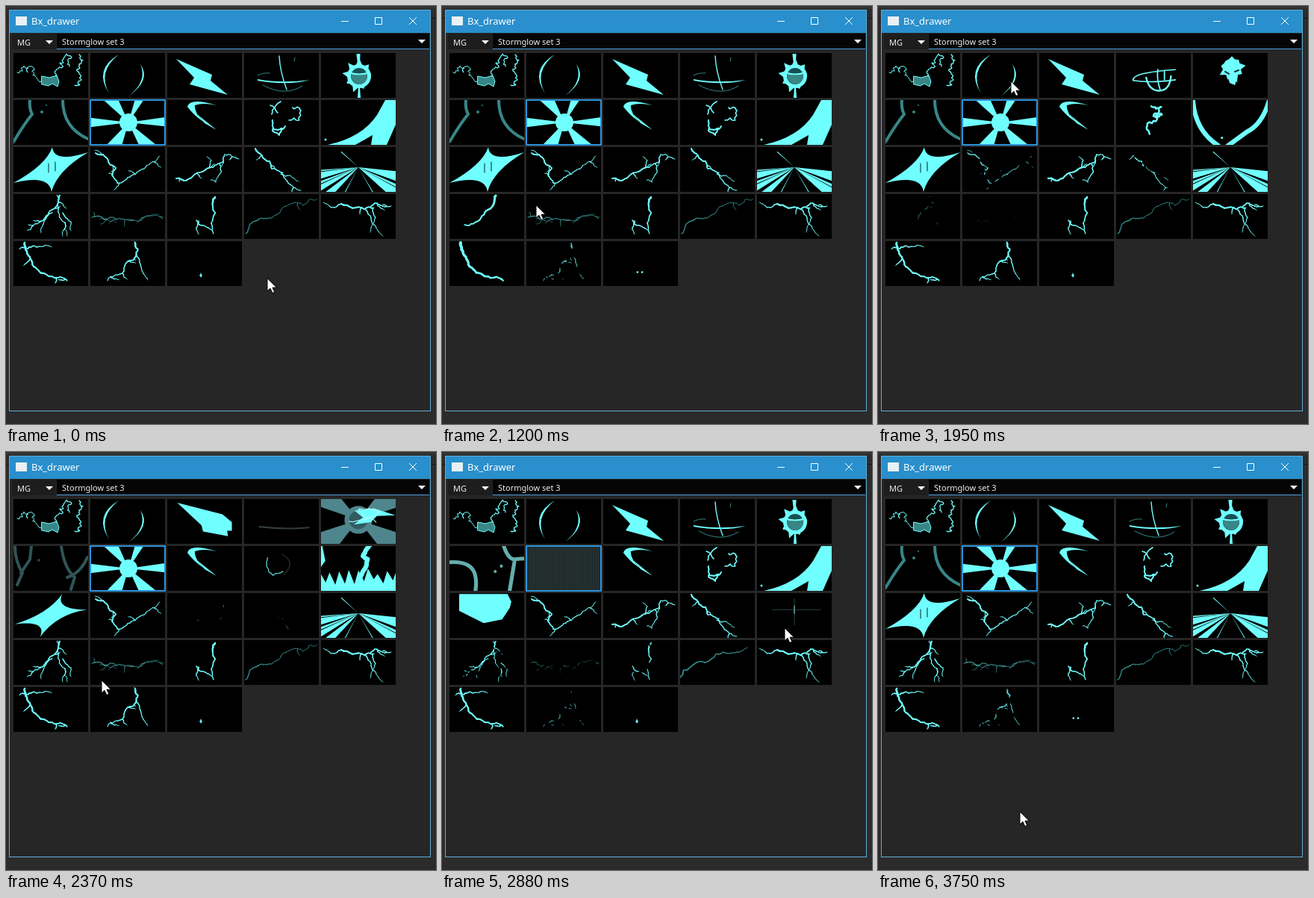
An HTML page with a canvas for the animation above (4.02 s loop, 576 by 560 pixels).

```html
<!DOCTYPE html>
<html lang="en">
<head>
<meta charset="utf-8">
<title>Preset browser</title>
<style>
  html, body { margin: 0; width: 100%; height: 100%; overflow: hidden; background: #2b2b2b; }
  svg, canvas { position: absolute; left: 0; top: 0; width: 576px; height: 560px; }
  text { font-family: "Noto Sans", "Open Sans", sans-serif; font-size: 11px; fill: #eee; }
  .title { font-size: 13px; fill: #fff; }
</style>
</head>
<body>
<svg viewBox="0 0 576 560">
  <path fill="#333" d="M0 0H576V4H0Z"/>
  <path stroke="#171717" d="M0 16.5H576"/>
  <path fill="#262626" d="M4 5H569V543H4Z"/>
  <path fill="#298fcd" d="M4 5H569V36H4Z"/>
  <rect x="4.5" y="5.5" width="564" height="537" fill="none" stroke="#5faed8"/>
  <path fill="#e9f1f4" d="M13 14H28V26H13Z"/>
  <text class="title" x="34" y="25">Bx_drawer</text>
  <path fill="none" stroke="#fff" d="M449 20.5H459M494.5 15.5H503.5V24.5H494.5ZM540 15L550 25M550 15L540 25"/>
  <path fill="#1d1d1d" d="M8 37H67V58H8Z"/>
  <path fill="#050505" d="M68 37H567V57H68Z"/>
  <path stroke="#4a9fe0" d="M68 57.5H567"/>
  <text x="15" y="53">MG</text>
  <text x="75" y="52">Stormglow set 3</text>
  <path fill="#f4f4f4" d="M53 46H63L58 51ZM552 45H562L557 50Z"/>
</svg>
<canvas width="576" height="560"></canvas>
<script>
const g = document.querySelector('canvas').getContext('2d');
const CYAN = '#70ffff', DIM = '#388686';
const LOOP = 4020, STEP = 30, START = 720, STOP = 3750, PLAY = 960;

const rnd = n => { const s = Math.sin(n * 127.1) * 43758.5453; return s - Math.floor(s); };
const polar = (x, y, deg, r) => {
  const a = deg * Math.PI / 180;
  return `${x + r * Math.cos(a)} ${y + r * Math.sin(a)}`;
};
const disc = (x, y, r) => `M${x - r} ${y}a${r} ${r} 0 1 1 ${2 * r} 0a${r} ${r} 0 1 1 ${-2 * r} 0Z`;

// Beams from a centre, as [angle, half width]
const beams = (x, y, r, ...list) => list.map(([a, h]) =>
  `M${x} ${y}L${polar(x, y, a - h, r)}L${polar(x, y, a + h, r)}Z`).join('');

// Closed star with tips of random length
const burst = (x, y, n, inner, outer, seed) => 'M' + Array.from({ length: 2 * n }, (_, i) =>
  polar(x, y, -90 + i * 180 / n, i % 2 ? inner : inner + (outer - inner) * rnd(seed + i))).join('L') + 'Z';

// Row of flames rising from the lower edge
const flames = (n, seed) => 'M0 60' + Array.from({ length: n }, (_, i) =>
  `L${i * 100 / n} ${30 + 10 * rnd(seed + i)}L${(i + .6) * 100 / n} ${44 + 8 * rnd(seed - i)}`).join('') + 'L100 32V60Z';

// Midpoint displacement between key points
function jag(text, seed, amp = .35) {
  const n = text.trim().split(' ').map(Number);
  let pts = [];
  for (let i = 0; i < n.length; i += 2) pts.push([n[i], n[i + 1]]);
  for (let level = 0; level < 3; level++) {
    pts = pts.flatMap((b, i) => {
      if (!i) return [b];
      const a = pts[i - 1], k = (rnd(seed++) - .5) * amp;
      return [[(a[0] + b[0]) / 2 - (b[1] - a[1]) * k, (a[1] + b[1]) / 2 + (b[0] - a[0]) * k], b];
    });
  }
  return pts;
}
const zig = (text, seed, amp) => 'M' + jag(text, seed, amp).map(p => p.join(' ')).join('L');

// Lightning: rest, flash of the main line, full, then broken up
let seed = 0;
function bolt(w, text, { twigs = 0, cut = .58, color = CYAN, flash } = {}) {
  const lines = text.split('/').map(t => jag(t, seed += 40));
  const main = lines[0], lead = flash ? jag(flash, seed) : main;
  for (let i = 0; i < twigs; i++) {
    const [x, y] = main[Math.floor((i + .5) / twigs * main.length)];
    const turn = (rnd(seed + i) - .5) * 24;
    lines.push(jag(`${x} ${y} ${x + turn} ${y + 6 + 4 * rnd(i + seed / 2) * (i % 2 ? 1 : -4)}`, seed += 7));
  }
  const all = (k, keep) => lines.forEach((l, i) => trace(l, w * k * (i ? .65 : 1), color, keep));
  return p => {
    if (p < .13) return all(1, 1);
    if (p < Math.min(cut, .4)) return trace(lead, w * 1.4, color, 1);
    if (p < cut) return all(1.15, 1);
    const keep = .04 + .7 * ((1 - p) / (1 - cut)) ** 1.5;
    g.globalAlpha = keep + .2;
    all(.85, keep);
    g.globalAlpha = 1;
  };
}

function trace(pts, w, color, keep) {
  g.strokeStyle = color;
  for (let i = 1; i < pts.length; i++) {
    if (rnd(Math.floor(i / 2) * 3.7 + pts[0][0]) > keep) continue;
    g.lineWidth = w * (1.3 - .7 * i / pts.length);
    g.beginPath();
    g.moveTo(...pts[i - 1]);
    g.lineTo(...pts[i]);
    g.stroke();
  }
}

// A layer is [path, colour, stroke width]; no width means fill
function paint(layers) {
  for (const [d, color = CYAN, w] of layers) {
    const path = new Path2D(d);
    if (w) { g.strokeStyle = color; g.lineWidth = w; g.stroke(path); }
    else { g.fillStyle = color; g.fill(path); }
  }
}

// Resting picture, then poses as [start, layers]; each grows a little while it stays
const poses = (rest, ...list) => p => {
  const now = list.filter(q => q[0] <= p).pop();
  if (!now || p > .95) return paint(rest);
  const s = .96 + (p - now[0]) * .25;
  g.translate(50, 30);
  g.scale(s, s);
  g.translate(-50, -30);
  paint(now[1]);
};

const patch = 'M38 31L48 33L58 30L61 38L59 45L52 41L47 44L38 42Z';
const sun = beams(51, 30, 90, [180, 7], [234, 12], [295, 9], [359, 7], [52, 13], [120, 14]) + disc(51, 30, 12);

const cells = [
  poses([
    [patch, DIM], [patch, CYAN, 1],
    [zig('5 26 14 17 28 21 26 30 38 37', 3, 1.3), CYAN, 1],
    [zig('57 31 64 20 67 8 78 6 75 18', 8, 1.1), CYAN, 1.2],
    [zig('88 2 91 13 85 24 91 36 82 43', 5, 1.1), CYAN, 1.3]
  ]),
  poses([['M38 2Q4 22 25 54Q9 25 38 2M67 15Q82 36 51 58Q77 38 67 15']]),
  poses([['M12 8L60 29L58 37L81 56L30 42L36 33Z']],
    [.2, [['M15 6L73 21L85 31V42H79L80 49L48 43L46 35Z']]]),
  poses([
    ['M18 35Q50 41 88 36Q60 44 18 37Z'], ['M47 4Q48 25 57 49', CYAN, 1.4],
    ['M25 43Q55 59 78 44M18 30Q25 26 34 27M68 6L67 11', DIM, 1]
  ], [.12, [
    ['M80 22Q20 26 22 37Q45 41 80 36', CYAN, 1.6], ['M40 33Q44 51 58 51T74 31', CYAN, 2.4], ['M56 22Q54 34 59 49M65 24V36', CYAN, 1.8]]],
  [.4, [['M21 37Q55 41 86 38', '#333d3d', 2]]], [.8, []]),
  poses([
    [burst(51, 31, 9, 14, 26, 4) + beams(51, 31, 30, [-92, 5], [90, 4])], [disc(51, 31, 16)],
    [disc(51, 31, 11), '#175052'], ['M40 28Q51 31 62 28Q62 41 51 42Q40 40 40 28', DIM], ['M37 26Q51 31 65 26', CYAN, 2]
  ], [.12, [
    [burst(52, 20, 9, 12, 21, 7)], ['M46 30H60L56 43L49 40Z'], ['M43 25L48 28M56 25L61 23', '#103030', 2]]],
  [.45, [
    [beams(50, 28, 75, [35, 17], [145, 17], [215, 16], [325, 17]) + disc(50, 28, 18), '#4f858c'],
    [disc(50, 28, 12), '#315c61'], ['M45 16L70 13L98 22L74 23L66 31L44 34L56 25Z'], [zig('38 30 78 17 50 14 73 31', 2), '#b5ffff', 1]]]),

  poses([
    ['M22 0Q21 12 25 19Q15 31 0 56M66 0Q66 38 102 53', DIM, 4], [disc(38, 16, 2) + disc(44, 7, 1), DIM]
  ], [.12, [
    ['M2 0Q2 20 12 36L5 52M24 0L22 18L10 36M64 0Q68 30 82 42L77 58M99 15Q90 36 72 42', '#315456', 4], [disc(34, 19, 2), '#273d3f']]],
  [.55, [
    ['M0 22Q24 20 32 32Q38 42 35 60M72 0Q78 19 87 18T102 17M86 22L80 58', '#65aeae', 5], [disc(69, 27, 2) + disc(61, 34, 2), '#65aeae']]]),
  poses([[sun]], [.5, [['M-20 -20H120V80H-20Z', '#202b2c'],
    [Array.from({ length: 34 }, (_, i) => `M${i * 3 + 1} 0V60`).join(''), '#2a3433', 1]]]),
  poses([['M66 7Q30 -4 27 9Q35 20 48 29Q36 16 37 7Q48 3 66 7M40 19L66 40L50 31Z']]),
  poses([
    [zig('35 7 41 10 45 17', 1) + zig('49 2 37 19', 2) + zig('65 10 76 14 60 27', 9, .9), CYAN, 1.6],
    [zig('38 27 38 41 47 47 55 35', 6) + zig('39 39 51 38', 4), CYAN, 2]
  ], [.12, [[zig('47 9 60 10 50 22 61 20 48 31 45 45', 11, .9), CYAN, 2.4]]],
  [.6, [[zig('32 16 31 28 39 39 52 34', 3), '#62dada', 1.2], ['M51 12Q70 22 53 38', '#263030', 1.2]]]),
  poses([['M86 0H100V33L88 60H67L69 47L46 60H9Q55 50 75 20Z' + disc(6, 53, 1.5)]],
    [.12, [['M1 -2Q3 40 34 60M101 0Q92 32 72 42L46 61', CYAN, 6], [disc(39, 50, 1.5)]]],
    [.55, [[flames(8, 5)], [zig('66 -2 56 14 62 18 50 50', 3, .2), CYAN, 6], ['M0 0H3L7 20L0 30Z']]]),

  poses([
    ['M52 0Q54 22 100 7Q58 32 51 60Q48 36 0 48Q44 24 52 0Z'], ['M43 19Q34 30 45 43M61 16Q69 28 58 42', CYAN, 2],
    [disc(51, 28, 9)], ['M47 22V34M56 20V32', '#052222', 1]
  ], [.1, [['M66 0Q55 22 100 22Q58 28 35 60Q46 36 0 42Q46 28 66 0Z']]],
  [.4, [['M14 2H77L82 12L80 20L70 35L46 40L26 30L14 24Z']]]),
  bolt(1.5, '7 8 24 18 34 28 29 38 36 48 55 38 74 27 93 12', { twigs: 6, flash: '6 11 18 20 35 22 36 41 48 42 68 19 84 23 100 39' }),
  bolt(1.6, '12 42 22 45 47 33 56 28 75 20 77 10 96 16/70 22 72 34 65 47 58 44/56 28 59 18 53 13',
    { twigs: 5, flash: '0 54 22 41 50 26 62 28 83 21 100 14' }),
  bolt(1.6, '15 2 34 19 37 29 58 46 76 58/49 36 73 46', { twigs: 4, cut: .42 }),
  poses([
    [beams(50, 27, 90, [168, 5], [154, 6], [138, 5], [13, 7], [33, 9])], [beams(50, 27, 90, [118, .8], [60, .8], [175, 1])],
    [beams(50, 27, 31, [222, 1])], [beams(50, 27, 85, [156, .8], [28, .6]), '#0b3434']
  ], [.02, [['M20 22H86M50 7V43', '#2b4848', 1], ['M50 17V27', '#508080', 2]]],
  [.3, [[beams(50, 27, 75, [160, 5], [25, 7], [125, 2], [200, 1])]]]),

  bolt(1.7, '62 2 59 14 42 32 20 41/59 14 69 38 72 56/66 25 77 37 77 49/52 25 40 40 37 52/69 38 66 56', { twigs: 6 }),
  bolt(.9, '2 31 35 34 58 35 98 31/13 33 36 38/66 34 92 27', { twigs: 7, cut: .4, color: '#42a0a0' }),
  bolt(2, '64 4 61 16 62 53/39 35 54 45 61 50/42 36 42 54', { cut: .3 }),
  bolt(1, '2 53 16 36 30 33 50 20 79 15 98 6', { twigs: 2, color: '#359090', flash: '0 50 33 30 67 18 90 10' }),
  bolt(1.8, '27 13 58 20 72 12 94 16/58 20 69 40 83 56/69 18 73 31 66 51/27 13 14 18 3 11', { twigs: 5 }),

  bolt(2.1, '15 2 18 14 27 34 47 47 68 50 72 53/18 10 32 8 51 8', { twigs: 5 }),
  bolt(1.7, '60 2 62 20 45 40 23 53/62 20 71 43 77 52', { twigs: 5, cut: .14 }),
  poses([[disc(45, 46, 1.7)], ['M45 43V48', CYAN, 1]],
    [.1, [[disc(46, 41, 1.3) + disc(52, 41, 1.3)]]],
    [.65, [[disc(40, 48, 1.3)]]])
];

// Pointer path as time, x, y
const track = [
  [720, 346, 364], [980, 90, 345], [1040, 28, 300], [1180, 118, 270], [1340, 165, 246],
  [1430, 225, 235], [1590, 440, 162], [1700, 430, 100], [1790, 405, 90], [1950, 178, 101],
  [2035, 150, 128], [2120, 98, 145], [2240, 40, 195], [2370, 128, 306], [2440, 165, 320],
  [2540, 220, 300], [2770, 430, 272], [2880, 459, 236], [3040, 460, 310], [3330, 312, 345],
  [3440, 210, 372], [3750, 190, 482]
];

// Cubic curve through the track
function pointer(t) {
  if (t < START) return [350, 365];
  const i = Math.min(track.length - 2, track.findLastIndex(k => k[0] <= t));
  const a = track[i], b = track[i + 1], before = track[i - 1] || a, after = track[i + 2] || b;
  const span = b[0] - a[0], u = (t - a[0]) / span, e = u * u * (3 - 2 * u);
  return [1, 2].map(n => {
    const m0 = (b[n] - before[n]) / (b[0] - before[0]) * span;
    const m1 = (after[n] - a[n]) / (after[0] - a[0]) * span;
    return a[n] + (b[n] - a[n]) * e + u * (1 - u) * ((1 - u) * m0 - u * m1);
  });
}

function cellAt([x, y]) {
  const c = Math.floor((x - 10) / 103), r = Math.floor((y - 63) / 63);
  return c >= 0 && c < 5 && r >= 0 ? r * 5 + c : -1;
}

// Entering a cell starts its preview unless it is still playing
const starts = cells.map(() => []);
for (let t = START, last = -1; t <= STOP; t += 5) {
  const c = cellAt(pointer(t));
  if (c !== last && starts[c] && !(t - starts[c].at(-1) < PLAY)) starts[c].push(t);
  last = c;
}

const arrow = new Path2D('M0 0V17L4 13.3L6.8 19.5L9.8 18.2L7 12.2H12.3Z');

function draw(t) {
  g.clearRect(0, 0, 576, 560);
  g.lineCap = g.lineJoin = 'round';
  cells.forEach((cell, i) => {
    const p = (t - starts[i].findLast(s => s <= t)) / PLAY;
    g.save();
    g.translate(10 + i % 5 * 103, 63 + Math.floor(i / 5) * 63);
    g.beginPath();
    g.rect(0, 0, 100, 60);
    g.clip();
    g.fillStyle = '#000';
    g.fillRect(0, 0, 100, 60);
    cell(p < 1 ? p : 0);
    g.restore();
  });
  g.strokeStyle = '#2b93dc';
  g.lineWidth = 2;
  g.strokeRect(113, 126, 100, 60);

  const [x, y] = pointer(t);
  g.save();
  g.translate(Math.round(x), Math.round(y));
  g.fillStyle = '#fff';
  g.strokeStyle = '#000';
  g.lineWidth = 1;
  g.fill(arrow);
  g.stroke(arrow);
  g.restore();
}

const origin = performance.now();
function frame() {
  const t = (performance.now() - origin) % LOOP;
  draw(Math.min(STOP, Math.floor(t / STEP) * STEP));
  requestAnimationFrame(frame);
}
frame();
</script>
</body>
</html>
```
